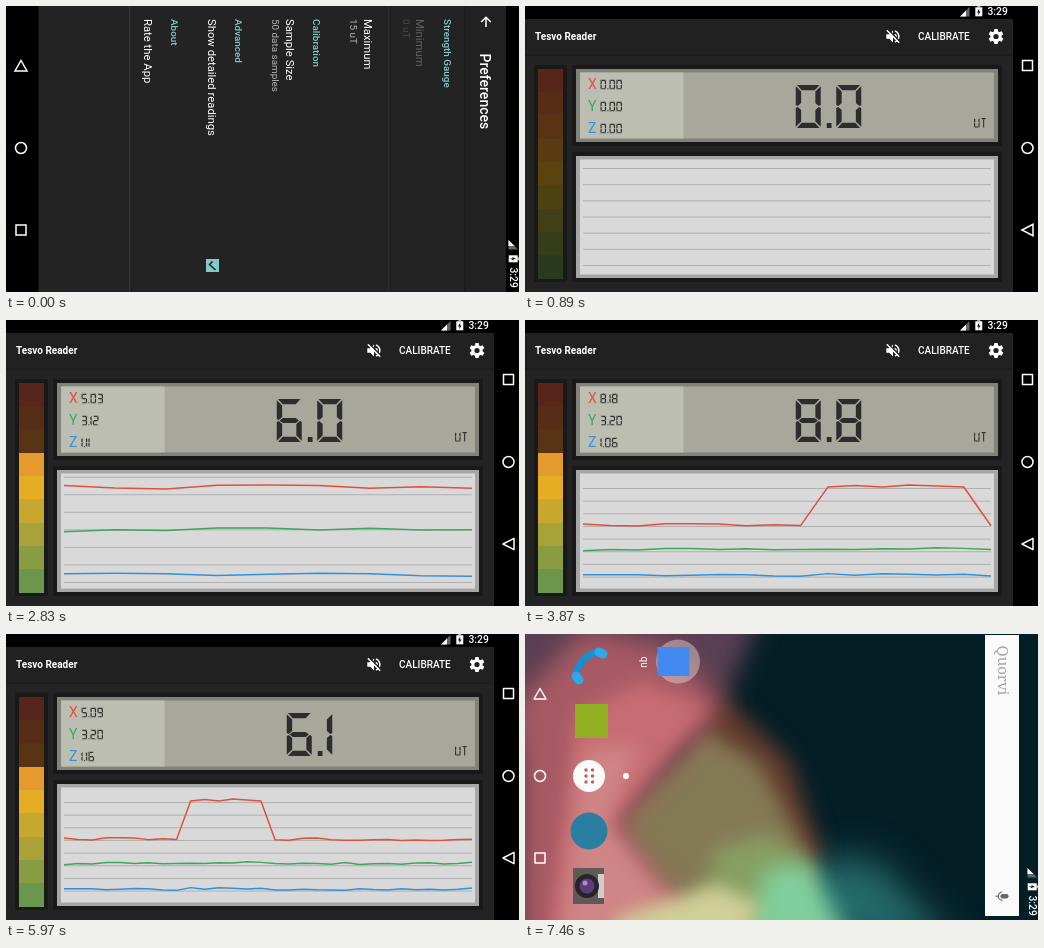
These frames come from a looping animation (513x286 px, 7600 ms). An HTML page with a canvas:

```html
<!DOCTYPE html>
<html lang="en">
<head>
<meta charset="utf-8">
<title>Field meter</title>
<style>
  html, body { margin: 0; width: 100%; height: 100%; overflow: hidden; background: #000; }
  canvas { display: block; width: 100vw; height: 100vh; }
</style>
</head>
<body>
<canvas id="stage" width="513" height="286"></canvas>
<script>
const ctx = document.getElementById('stage').getContext('2d');
const LOOP = 7600, FIRST_SAMPLE = 1640, SAMPLE_STEP = 149.1, SAMPLES = 34;
const PORTRAIT_SHIFT = -201;
const APP = 'Tesvo Reader', TEAL = '#80cbc4', BACK = '#232323', BAR = '#212121';

const AXES = [
  { name: 'X', color: '#e0503f', level: 5.1, peak: 3.08 },
  { name: 'Y', color: '#3fa65c', level: 3.18, peak: 0.04 },
  { name: 'Z', color: '#3191dc', level: 1.16, peak: 0 }
];
const READINGS = [[0, 0, 0], [5.15, 3.04, 1.22], [5.03, 3.12, 1.11], [8.18, 3.2, 1.06],
  [5.12, 3.12, 1.21], [5.09, 3.2, 1.16], [5.26, 3.03, 1.02]];

const isPeak = i => i >= 9 && i <= 14;
function noise(seed) {
  const s = Math.sin(seed * 12.9898) * 43758.5453;
  return (s - Math.floor(s)) * 2 - 1;
}
const sample = (axis, i) => AXES[axis].level + (isPeak(i) ? AXES[axis].peak : 0) + .11 * noise(i * 3 + axis + 1);

function box(x, y, w, h, color) {
  ctx.fillStyle = color;
  ctx.fillRect(x, y, w, h);
}
function text(str, x, y, size, color = '#fff', weight = 400, family = 'Roboto, sans-serif') {
  ctx.font = `${weight} ${size}px ${family}`;
  ctx.fillStyle = color;
  ctx.fillText(str, x, y);
}
function paint(color) {
  if (color) { ctx.fillStyle = color; ctx.fill(); } else ctx.stroke();
}
function poly(points, color) {
  ctx.beginPath();
  points.forEach(([x, y]) => ctx.lineTo(x, y));
  ctx.closePath();
  paint(color);
}
function disc(x, y, r, color) {
  ctx.beginPath();
  ctx.arc(x, y, r, 0, 7);
  paint(color);
}
function pen(color, width) {
  ctx.strokeStyle = color;
  ctx.lineWidth = width;
}
function line(points) {
  ctx.beginPath();
  points.forEach(([x, y]) => ctx.lineTo(x, y));
  ctx.stroke();
}

// Segment display on a 25 x 43 cell; most segments are mirrored copies.
const flipX = p => p.map(([x, y]) => [25 - x, y]);
const flipY = p => p.map(([x, y]) => [x, 43 - y]);
const bar = [[1.2, 0], [23.8, 0], [19, 5.2], [6, 5.2]];
const post = [[0, 1.2], [5.4, 6.4], [5.4, 18], [2, 21], [0, 20]];
const SEG = {
  a: bar, d: flipY(bar), f: post, b: flipX(post), e: flipY(post), c: flipX(flipY(post)),
  g: [[2.8, 21.5], [6, 18.9], [19, 18.9], [22.2, 21.5], [19, 24.1], [6, 24.1]],
  t: [[10, 6], [15, 6], [15, 43], [10, 43]], p: [[0, 38], [4.8, 38], [4.8, 43], [0, 43]]
};
const GLYPH = { 0: 'abcdef', 1: 'bc', 2: 'abged', 3: 'abgcd', 4: 'fgbc', 5: 'afgcd', 6: 'afgecd',
  7: 'abc', 8: 'abcdefg', 9: 'abcdfg', U: 'bcdef', T: 'at', '.': 'p' };
const advance = ch => ch === '.' ? 9.5 : ch === '1' ? 11 : 31;
const segmentWidth = str => [...str].reduce((sum, ch) => sum + advance(ch), -6);
function segments(str, x, y, scale, color) {
  ctx.save();
  ctx.translate(x, y);
  ctx.scale(scale, scale);
  for (const ch of str) {
    ctx.save();
    if (ch === '1') ctx.translate(-20, 0);
    for (const s of GLYPH[ch]) poly(SEG[s], color);
    ctx.restore();
    ctx.translate(advance(ch), 0);
  }
  ctx.restore();
}

function statusIcons(shift) {
  ctx.save();
  ctx.translate(shift, 0);
  poly([[435, 10.5], [444.5, 10.5], [444.5, 1]], '#666');
  poly([[435, 10.5], [441, 10.5], [441, 4.5]], '#fff');
  box(450.3, 1.3, 7, 9, '#fff');
  box(452.3, .3, 3, 1, '#fff');
  poly([[454.3, 2.5], [452, 6.5], [453.7, 6.5], [453, 9.5], [455.6, 5.5], [454, 5.5]], '#000');
  text('3:29', 462.5, 9, 10.3, '#fff', 500);
  ctx.restore();
}
function muteIcon(x, y) {
  ctx.save();
  ctx.translate(x, y);
  poly([[-6.7, -2.2], [-3.7, -2.2], [0, -6], [0, 6], [-3.7, 2.2], [-6.7, 2.2]], '#fff');
  ctx.beginPath();
  ctx.arc(1, 0, 2.8, -1.4, 1.4);
  paint('#fff');
  pen('#fff', 1.5);
  ctx.beginPath();
  ctx.arc(0, 0, 5.9, -1.25, 1.25);
  ctx.stroke();
  pen(BAR, 1.6);
  line([[-5, -7], [7, 5]]);
  pen('#fff', 1.4);
  line([[-6.2, -6.2], [6.2, 6.2]]);
  ctx.restore();
}
function gear(x, y) {
  ctx.save();
  ctx.translate(x, y);
  for (let i = 0; i < 6; i++) {
    poly([[-2.3, -4], [-1.6, -7.5], [1.6, -7.5], [2.3, -4]], '#fff');
    ctx.rotate(Math.PI / 3);
  }
  disc(0, 0, 5.6, '#fff');
  disc(0, 0, 2.6, BAR);
  ctx.restore();
}
function appBar(width, bottom, shift) {
  const mid = (13 + bottom) / 2 - 1;
  box(0, 13, width, bottom - 13, BAR);
  box(0, bottom - 2, width, 2, '#1c1c1c');
  text(APP, 10, mid + 3.6, 10, '#fff', 700);
  muteIcon(368 + shift, mid);
  text('CALIBRATE', 393 + shift, mid + 3.6, 10, '#fff', 500);
  gear(471 + shift, mid);
}

const mix = (a, b, k) => a.map((v, i) => v + (b[i] - v) * k);
function gaugeColor(i) {
  const red = [224, 95, 66], amber = [229, 173, 36], green = [108, 150, 75];
  return i < 4 ? mix(red, amber, i / 4) : mix(amber, green, (i - 4) / 4);
}
function gauge(x, y, w, h, lit) {
  box(x, y, w, h, '#191919');
  const step = (h - 7) / 9;
  for (let i = 0; i < 9; i++) {
    const dim = i < 9 - lit ? .39 : 1;
    const from = Math.round(y + 3.5 + i * step), to = Math.round(y + 3.5 + (i + 1) * step);
    box(x + 4, from, w - 8, to - from, `rgb(${gaugeColor(i).map(c => c * dim)})`);
  }
}
function frame(x, y, w, h, border, fill) {
  box(x, y, w, h, '#191919');
  box(x + 4, y + 4, w - 8, h - 8, border);
  box(x + 8, y + 7.5, w - 16, h - 15, fill);
}
function readout(x, y, w, h, values) {
  frame(x, y, w, h, '#828378', '#a7a89b');
  const side = (w - 16) / 4;
  box(x + 8, y + 7.5, side, h - 15, '#bdbeb2');
  values.forEach((v, i) => {
    const base = y + 24 + i * 22;
    text(AXES[i].name, x + 16, base, 14, AXES[i].color);
    segments(v.toFixed(2), x + 28.5, base - 9.2, .222, '#303030');
  });
  const total = Math.hypot(...values).toFixed(1);
  const centre = x + 8 + side + (w - 16 - side) * .467;
  segments(total, centre - segmentWidth(total) / 2, y + 20, 1, '#2d2d2d');
  segments('UT', x + w - 28, y + 53, .222, '#303030');
}
function chart(x, y, w, h, n) {
  frame(x, y, w, h, '#a6a6a6', '#d9d9d9');
  const early = n < 10;
  const [start, step, rows] = n === 0 ? [y + 16, (h - 33) / 6, 7] : early ? [156.7, 17.55, 7] : [168, 12.65, 8];
  for (let i = 0; i < rows; i++) box(x + 11, start + i * step, w - 22, 1, '#b0b0b0');
  if (n < 2) return;
  const toY = v => early ? 169 + (5.03 - v) * 21.95 : 257 + (1 - v) * 12.65;
  ctx.lineJoin = 'round';
  AXES.forEach(({ color }, axis) => {
    pen(color, 1.5);
    line(Array.from({ length: n }, (_, i) => [x + 11 + i * 408 / (n - 1), toY(sample(axis, i))]));
  });
}

function portrait(draw) {
  ctx.save();
  ctx.translate(513, 0);
  ctx.rotate(Math.PI / 2);
  draw();
  ctx.restore();
}
function portraitNav() {
  pen('#fff', 1.5);
  poly([[54.5, 498], [65, 492], [65, 504]]);
  disc(142, 498, 5.5);
  ctx.strokeRect(219, 493, 10, 10);
}
function portraitShell() {
  box(0, 0, 286, 513, '#000');
  box(0, 13, 286, 467.5, BACK);
  statusIcons(PORTRAIT_SHIFT);
  portraitNav();
}

function preferences() {
  portraitShell();
  box(0, 13, 286, 41, BAR);
  box(0, 53, 286, 2, '#1c1c1c');
  pen('#fff', 1.5);
  line([[21, 33], [11.5, 33]]);
  line([[16, 28.2], [11.2, 33], [16, 37.8]]);
  text('Preferences', 47.5, 39, 14, '#fff', 500);
  const head = (s, y) => text(s, 13, y, 9.9, TEAL, 500);
  const item = (s, y, c) => text(s, 13, y, 11.3, c);
  const note = (s, y, c = '#b3b3b3') => text(s, 13, y, 9.9, c);
  head('Strength Gauge', 75.2);
  item('Minimum', 103, '#606060');
  note('0 uT', 116.5, '#484848');
  box(0, 130, 286, 1, '#2d2d2d');
  item('Maximum', 155.5);
  note('15 uT', 169);
  head('Calibration', 206);
  item('Sample Size', 233.5);
  note('50 data samples', 247.5);
  head('Advanced', 284);
  item('Show detailed readings', 311.5);
  box(253, 300, 13, 13, TEAL);
  pen(BACK, 1.6);
  line([[255.5, 306.5], [258.5, 309.5], [264, 303.5]]);
  head('About', 348.5);
  item('Rate the App', 375.5);
  box(0, 389, 286, 1, '#353535');
}
function portraitMeter() {
  portraitShell();
  appBar(286, 54, PORTRAIT_SHIFT);
  gauge(9, 63, 33, 406, 0);
  readout(47, 63, 230, 81, READINGS[0]);
  chart(47, 150, 230, 319, 0);
}
function landscapeMeter(n, reading) {
  box(0, 0, 513, 286, '#000');
  box(0, 13, 488, 273, BACK);
  statusIcons(0);
  appBar(488, 50, 0);
  pen('#fff', 1.5);
  ctx.strokeRect(497.5, 54.5, 10, 10);
  disc(502.5, 142, 5.5);
  poly([[497, 224], [508, 218.3], [508, 229.7]]);
  gauge(9, 59, 33, 217, n === 0 ? 0 : isPeak(n - 1) ? 8 : 6);
  readout(47, 59, 430, 81, READINGS[reading]);
  chart(47, 146, 430, 130, n);
}

function wallpaper() {
  box(0, 0, 513, 286, '#041e26');
  const haze = (r, color, ...pts) => {
    ctx.filter = `blur(${r}px)`;
    poly(pts, color);
  };
  ctx.save();
  haze(18, '#246a6c', [270, 225], [350, 225], [430, 310], [250, 310]);
  haze(12, '#5a3f52', [-30, -30], [240, -30], [195, 80], [-30, 120]);
  haze(10, '#603a2c', [150, 60], [205, 68], [265, 125], [300, 225], [200, 240]);
  haze(10, '#857a56', [180, 95], [235, 130], [285, 225], [230, 310], [60, 310], [90, 180]);
  haze(13, '#a85a64', [-10, 70], [60, -5], [150, 15], [198, 72], [95, 190], [180, 310], [-10, 310]);
  haze(9, '#c66c72', [50, 80], [115, 48], [184, 72], [85, 190], [130, 310], [25, 310]);
  haze(10, '#cf8686', [60, 115], [115, 112], [80, 190], [185, 310], [35, 310]);
  haze(10, '#879f62', [190, 215], [245, 200], [290, 235], [270, 310], [170, 310]);
  haze(11, '#7fcf9c', [240, 235], [285, 230], [325, 310], [220, 310]);
  haze(9, '#cfcf98', [90, 285], [190, 250], [235, 270], [220, 310], [90, 310]);
  ctx.restore();
}
function homeScreen() {
  wallpaper();
  portrait(() => {
    box(1, 19, 281, 34, '#fafafa');
    text('Quorvi', 11.5, 40.5, 15, '#a5a5a5', 400, '"Noto Serif", serif');
    ctx.beginPath();
    ctx.roundRect(260, 29.5, 4.5, 8, 2.2);
    paint('#666');
    pen('#666', 1.2);
    ctx.beginPath();
    ctx.arc(262.2, 35.5, 4.2, 0, Math.PI);
    ctx.stroke();
    line([[262.2, 39.7], [262.2, 42.5]]);
    statusIcons(PORTRAIT_SHIFT);
    portraitNav();
    disc(27.5, 360, 22, 'rgba(235,225,225,.42)');
    box(13, 348.5, 29, 32, '#438af0');
    text('qu', 22.5, 397, 10);
  });
  // Dock
  ctx.lineCap = 'round';
  pen('#198fd0', 7);
  ctx.beginPath();
  ctx.moveTo(76, 18);
  ctx.bezierCurveTo(62, 18, 50, 32, 51, 45);
  ctx.stroke();
  pen('#2ba9ea', 9);
  line([[74, 18], [78, 20]]);
  line([[51, 42], [54, 46]]);
  ctx.lineCap = 'butt';
  box(50, 70, 33, 34, '#8fb021');
  disc(64, 142, 16, '#fafafa');
  for (let i = 0; i < 6; i++) disc(61 + i % 2 * 6.5, 136 + (i >> 1) * 6, 1.7, '#b55f68');
  disc(101, 142, 3, '#fff');
  disc(64, 197, 18.5, '#2a7ea2');
  box(48, 234, 31, 36, '#5e5a58');
  box(73, 240, 6, 24, '#d0cdca');
  disc(62, 252, 12, '#262329');
  disc(62, 252, 7.5, '#5f3c78');
  disc(60, 249, 2.5, '#b28ac4');
}

// The readout refreshes more slowly than the chart.
function sceneAt(t) {
  if (t < 440) return ['prefs'];
  if (t < 890) return ['portrait'];
  if (t >= 7310) return ['home'];
  const n = Math.max(0, Math.min(SAMPLES, Math.floor((t - FIRST_SAMPLE + 8) / SAMPLE_STEP) + 1));
  const reading = t >= 6860 ? 6 : Math.floor((n + 5) / 7);
  return ['meter', n, reading];
}
const SCENES = { prefs: () => portrait(preferences), portrait: () => portrait(portraitMeter),
  home: homeScreen, meter: landscapeMeter };

const begin = performance.now();
let shown = '';
function tick() {
  const scene = sceneAt((performance.now() - begin) % LOOP);
  const key = scene.join();
  if (key !== shown) {
    shown = key;
    SCENES[scene[0]](...scene.slice(1));
  }
  requestAnimationFrame(tick);
}
tick();
</script>
</body>
</html>
```
